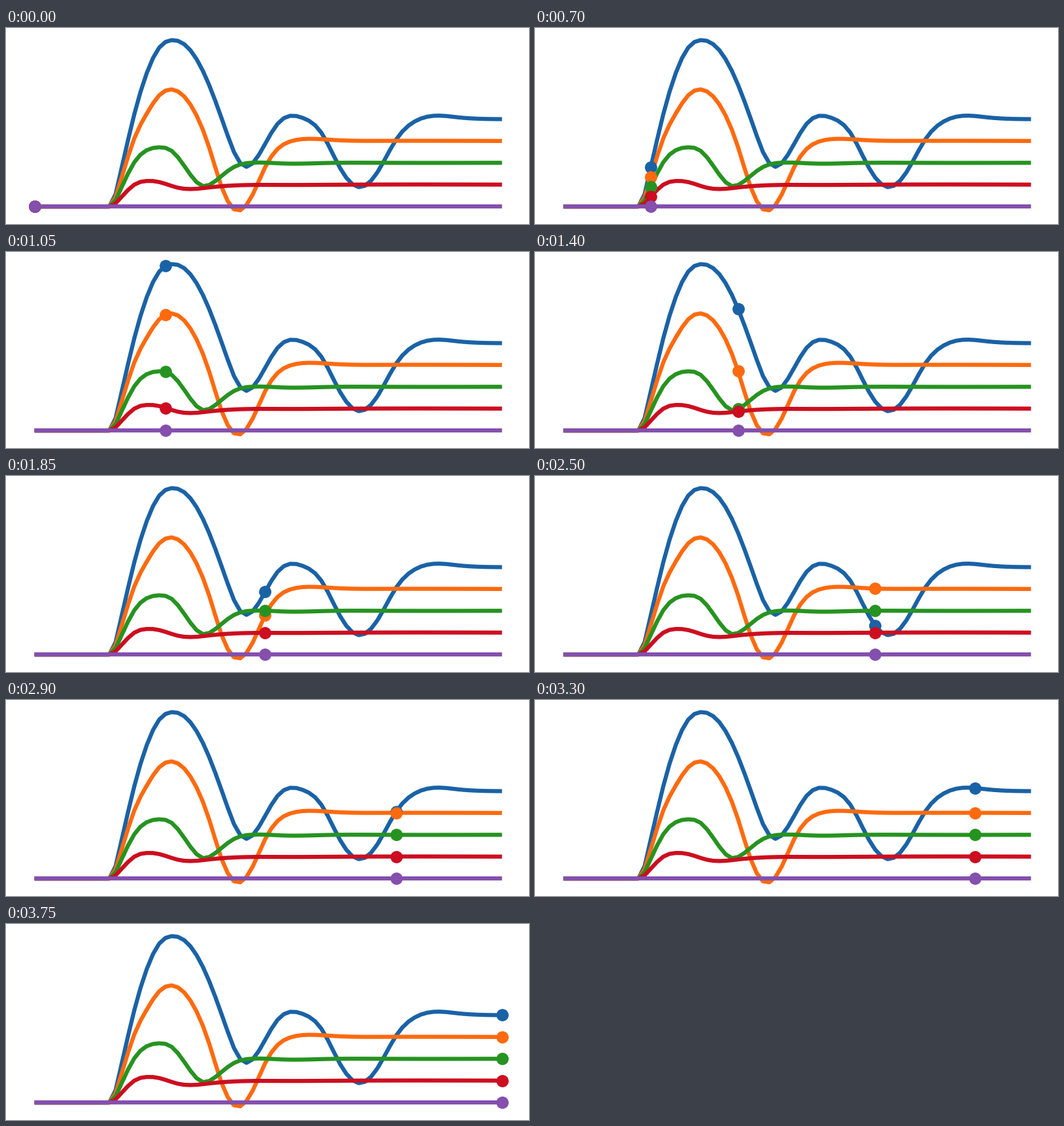
Write a matplotlib script that moves like this. It is 800 px wide and 300 px high and loops after 3800 ms.

```python
import numpy as np
import matplotlib.pyplot as plt
from matplotlib.animation import FuncAnimation

W, H, DPI = 800, 300, 100
PT = 72 / DPI       # points per pixel
STEPS = 76
START = 13          # first step at which the curves leave the base line
BASE = 273.1        # y of the base line in pixels
UNIT = 33.4         # height of one command level in pixels

step = np.arange(STEPS)
X = np.linspace(43.7, 758.7, STEPS)


def spline(x, xk, yk):
    """Natural cubic spline through the key points."""
    n = len(xk)
    line = np.column_stack([np.ones(n), xk])
    cubes = np.abs(xk[:, None] - xk) ** 3
    system = np.block([[cubes, line], [line.T, np.zeros((2, 2))]])
    coef = np.linalg.solve(system, np.append(yk, [0, 0]))
    basis = np.column_stack([np.abs(x[:, None] - xk) ** 3, np.ones(len(x)), x])
    return basis @ coef


def response(level, keys):
    """Flat start, then a swing through the keys that settles at the level."""
    y = np.full(STEPS, BASE)
    if level:
        rise = level * UNIT
        first = [(START, BASE - 0.14 * rise), (START + 1, BASE - 0.45 * rise)]
        last = [(STEPS - 1, BASE - rise)]
        xk, yk = np.array(first + keys + last, float).T
        y[START:] = spline(step[START:], xk, yk)
    return y


# Key points of each swing: (step, y), mostly turning points and flanks.
BLUE = [(16, 132), (18, 69), (20, 30), (22, 18.5), (25, 34), (28, 87),
        (31, 165), (32, 190), (34, 212.5), (36, 194), (39, 146.5),
        (41, 134.4), (43, 137.5), (46, 160), (49, 214), (52, 243.5),
        (55, 221), (58, 171), (61, 143), (64, 134.4), (68, 136.8)]
ORANGE = [(16, 169), (18, 131), (20, 103), (22, 94), (25, 117), (28, 182.5),
          (30, 243), (32, 277.5), (33, 279), (35, 255), (37, 213),
          (39, 185), (41, 173.7), (44, 169.6), (48, 171.4), (56, 172.7)]
GREEN = [(16, 205.5), (18, 187), (20, 182.6), (22, 188), (25, 224.5),
         (27, 242), (28, 240.4), (30, 226.5), (32, 212.7), (35, 206.1),
         (40, 207.4), (47, 206.6), (55, 206.3)]
RED = [(16, 239.8), (18, 234.1), (20, 235.8), (23, 244.5), (25, 246.5),
       (28, 244), (32, 241), (40, 240.2), (50, 239.8)]

SERIES = [
    (response(4, BLUE), "#1a62a6"),
    (response(3, ORANGE), "#ff6a0f"),
    (response(2, GREEN), "#269320"),
    (response(1, RED), "#cc0e20"),
    (response(0, []), "#844fad"),
]

fig = plt.figure(figsize=(W / DPI, H / DPI), dpi=DPI, facecolor="white")
ax = fig.add_axes([0, 0, 1, 1])
ax.set_xlim(0, W)
ax.set_ylim(H, 0)
ax.axis("off")

dots = []
for y, color in SERIES:
    ax.plot(X, y, color=color, lw=6.25 * PT, solid_capstyle="butt",
            solid_joinstyle="round", snap=False, zorder=2)
    dot, = ax.plot(X[:1], y[:1], "o", color=color, ms=18.8 * PT, mew=0,
                   snap=False, zorder=3)
    dots.append(dot)


def update(i):
    for dot, (y, _) in zip(dots, SERIES):
        dot.set_data([X[i]], [y[i]])
    return dots


anim = FuncAnimation(fig, update, frames=STEPS, interval=50, repeat=True,
                     repeat_delay=0)
plt.show()
```
